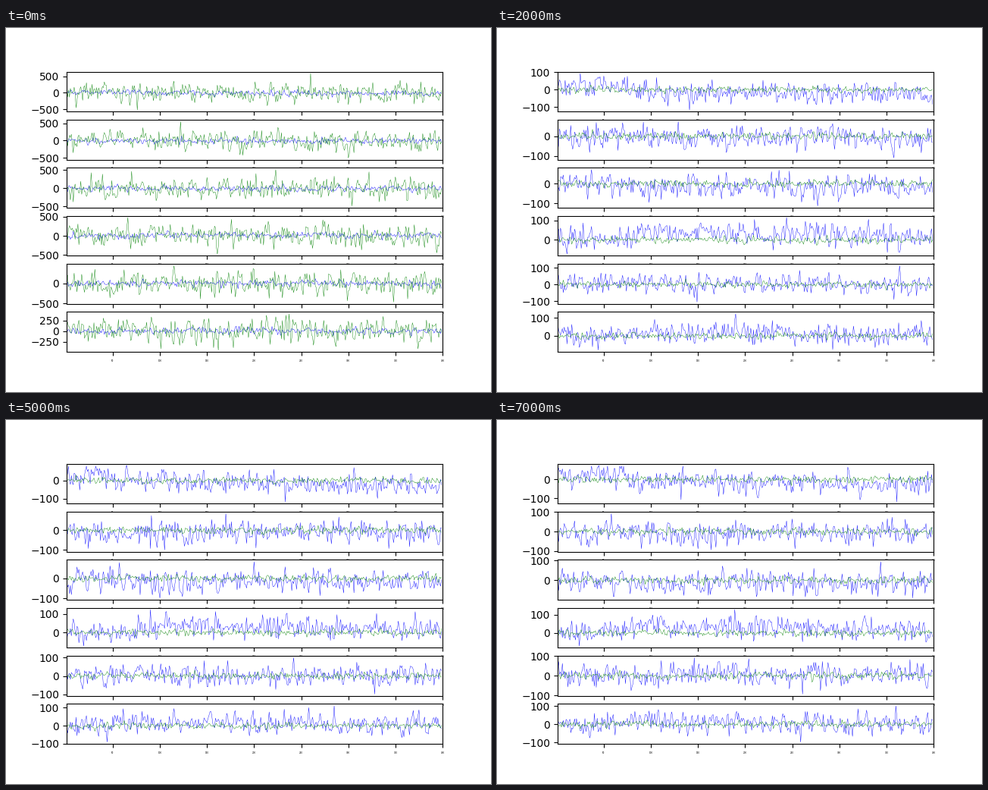
Animation, 640 px wide and 480 px high, one loop 8000 ms. Source, as a matplotlib script:

```python
import numpy as np
import matplotlib.pyplot as plt
from matplotlib.animation import FuncAnimation

STEPS, N = 8, 400
X = np.arange(N)

# Per row: level before the jump, right after it, and at the end of the signal
LEVELS = [(24, -4, -28), (-8, -8, -8), (-2, -18, -12),
          (2, 38, 16), (4, 4, 2), (3, 18, 2)]

# Per row: y range just after the first step and the range it drifts to
START = [(-125, 107), (-122, 78), (-128, 75), (-82, 121), (-120, 128), (-86, 138)]
END = [(-130, 85), (-104, 102), (-98, 103), (-82, 138), (-103, 101), (-109, 112)]


def y_range(step, row):
    if step == 0:
        return -575 + 17 * row, 640 - 38 * row
    t = (step - 1) / (STEPS - 2)
    return (1 - t) * np.array(START[row]) + t * np.array(END[row])


def trend(row):
    before, after, last = LEVELS[row]
    return np.interp(X, [0, 70, 82, N], [before, before, after, last])


def noise(rng, std):
    raw = np.convolve(rng.normal(size=N + 1), [1, 0.25], "valid")
    return std * raw / raw.std()


def fill_range(y, low, high):
    """Let the extremes of y reach the range less the usual 5% margin."""
    pad = (high - low) / 22
    top, bottom = y.argmax(), y.argmin()
    y = np.clip(y, 0.85 * low, 0.85 * high)
    y[top], y[bottom] = high - pad, low + pad
    return y


def signals(step, row):
    rng = np.random.default_rng(100 * step + row)
    low, high = y_range(step, row)
    if step == 0:
        blue = 0.6 * trend(row) + noise(rng, 42) + 15 * np.sin(X / 9 + row)
        return blue, fill_range(noise(rng, 155), low, high)
    blue = trend(row) + noise(rng, 31)
    return fill_range(blue, low, high), noise(rng, 9)


fig, axes = plt.subplots(len(LEVELS), 1, figsize=(6.4, 4.8), dpi=100)
lines = []
for ax in axes:
    lines.append([ax.plot([], [], color=c, lw=0.3)[0] for c in ("blue", "green")])
    ax.set_xlim(1, N)
    ax.set_xticks(range(50, N + 1, 50))
    ax.tick_params(axis="x", labelsize=2)


def draw(step):
    for row, ax in enumerate(axes):
        for line, y in zip(lines[row], signals(step, row)):
            line.set_data(X, y)
        ax.set_ylim(*y_range(step, row))
    return sum(lines, [])


anim = FuncAnimation(fig, draw, frames=STEPS, interval=1000, repeat=True,
                     repeat_delay=0, blit=False)
plt.show()
```
